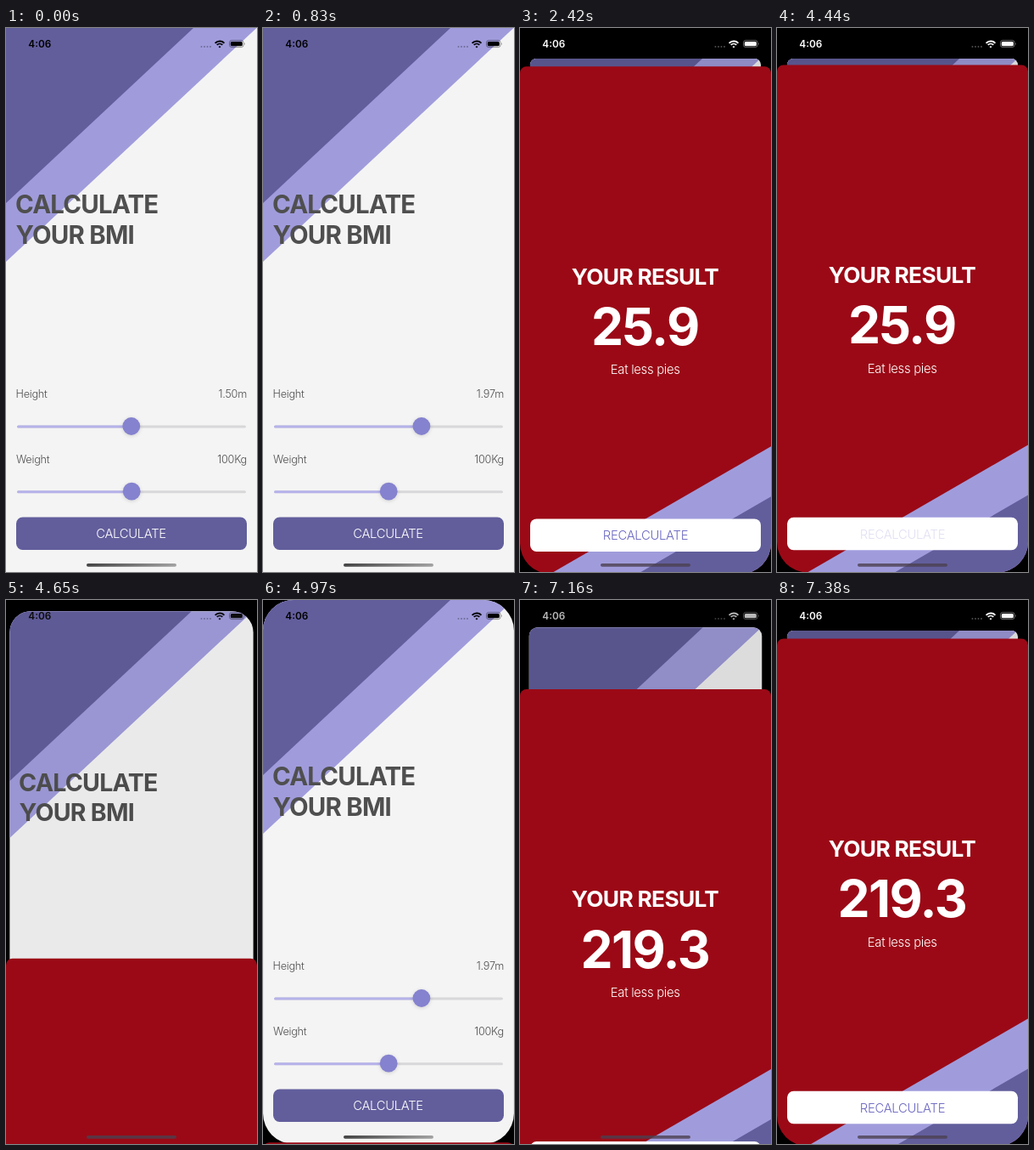
Animation of 296 by 640 pixels, one loop 8 s. Source, as an HTML page:

```html
<!DOCTYPE html>
<html lang="en">
<head>
<meta charset="utf-8">
<title>BMI calculator</title>
<style>
  html, body { margin: 0; width: 100%; height: 100%; overflow: hidden; background: #000; }
  #stage { position: relative; width: 296px; height: 640px; overflow: hidden; background: #000; }
  #stage > * { position: absolute; left: 0; top: 0; overflow: hidden; }
  svg { display: block; }
  #card { width: 296px; height: 640px; background: #f4f4f4; transform-origin: 0 0; }
  #dim { position: absolute; inset: 0; background: #000; }
  #modal { width: 296px; height: 596.5px; background: #9b0916; border-radius: 7.6px 7.6px 36px 36px; }
  text {
    font-family: Inter, "Open Sans", sans-serif;
    font-optical-sizing: none;
    font-weight: 300;
    letter-spacing: -.02em;
  }
  .bold { font-weight: 700; letter-spacing: -.026em; }
  .mid { text-anchor: middle; }
  .end { text-anchor: end; }
  .title { font-size: 29.4px; fill: #4f4f4f; }
  .label { font-size: 12.7px; fill: #505050; }
  .action { font-size: 14.8px; }
  .time { font-size: 11.8px; font-weight: 600; letter-spacing: 0; }
  .thumb { fill: #8582cf; filter: drop-shadow(0 1px 2px rgba(0, 0, 0, .15)); }
</style>
</head>
<body>
<div id="stage">
  <div id="card">
    <svg width="296" height="640">
      <path d="M0 0H295.5L0 275z" fill="#a09cdc"/>
      <path d="M0 0H221L0 206z" fill="#625e9c"/>
      <text class="title bold" x="11" y="218">CALCULATE</text>
      <text class="title bold" x="11.5" y="254">YOUR BMI</text>
      <text class="label" x="11.5" y="435.3">Height</text>
      <text class="label end" id="height" x="284" y="435.3"></text>
      <text class="label" x="12" y="511.8">Weight</text>
      <text class="label end" x="284" y="511.8">100Kg</text>
      <g id="sliders"></g>
      <rect x="12" y="575.5" width="272" height="38.5" rx="7.6" fill="#625e9c"/>
      <text class="action mid" id="calc" x="147.5" y="600.3" fill="#fff">CALCULATE</text>
    </svg>
    <div id="dim"></div>
  </div>
  <div id="modal">
    <svg width="296" height="597">
      <path d="M296 447L34 598H296z" fill="#a09cdc"/>
      <path d="M296 506L137 598H296z" fill="#625e9c"/>
      <g fill="#fff">
        <text class="bold mid" x="147.5" y="256.5" font-size="26.3">YOUR RESULT</text>
        <text class="bold mid" id="result" x="147.3" y="327.8" font-size="60.5"></text>
        <text class="action mid" x="147.7" y="362">Eat less pies</text>
        <rect x="12" y="532.2" width="272" height="38.5" rx="7.6"/>
      </g>
      <text class="action mid" id="recalc" x="148" y="557" fill="#6a66c0">RECALCULATE</text>
    </svg>
  </div>
  <svg id="status" width="296" height="640" fill="currentColor">
    <defs>
      <linearGradient id="sheen">
        <stop offset="0" stop-color="#444"/>
        <stop offset="1" stop-color="#a2a2a2"/>
      </linearGradient>
    </defs>
    <text class="time" x="26.3" y="23">4:06</text>
    <g opacity=".3">
      <circle cx="230.5" cy="22" r="1"/><circle cx="234" cy="22" r="1"/>
      <circle cx="237.5" cy="22" r="1"/><circle cx="241" cy="22" r="1"/>
    </g>
    <g fill="none" stroke="currentColor" stroke-width="1.9">
      <path d="M246.6 17.8a7.6 7.6 0 0 1 10.8 0"/>
      <path d="M248.75 19.95a4.6 4.6 0 0 1 6.5 0"/>
    </g>
    <path d="M252 23.4l-1.5-1.5a2.1 2.1 0 0 1 3 0z"/>
    <rect x="263.5" y="14.6" width="16.6" height="8" rx="2.6" fill="none" stroke="currentColor" opacity=".4"/>
    <rect x="264.8" y="15.9" width="14" height="5.4" rx="1.5"/>
    <path d="M281.2 17.2q1.4 1.4 0 2.8z" opacity=".5"/>
    <rect id="home" x="95" y="630" width="106" height="3.7" rx="1.85"/>
  </svg>
</div>
<script>
const LOOP = 8000;
// The picture holds still between these moments.
const STEPS = [0, 500, 610, 720, 830, 1860, 1970, 2080, 2200, 2310, 2420,
  4440, 4540, 4650, 4760, 4860, 4970, 5460, 5580, 5700, 5810, 5930, 6050,
  6820, 7050, 7160, 7270, 7380];
const OPEN_1 = 1978, CLOSE = 4532, OPEN_2 = 6949;
const WEIGHT = 100, TALL = 1.966, SMALL = .6753;
const $ = id => document.getElementById(id);
const mix = (a, b, k) => a + (b - a) * k;

// Critically damped spring: share of the way still to go.
function spring(ms) {
  const u = 18.26 * ms / 1000;
  return (1 + u) * Math.exp(-u);
}

function openness(t) {
  if (t < OPEN_1) return 0;
  if (t < 4440) return 1 - spring(t - OPEN_1);
  if (t < CLOSE) return 1;
  if (t < 5460) return spring(t - CLOSE);
  if (t < OPEN_2) return 0;
  return 1 - spring(t - OPEN_2);
}

function drag(t, start, end, from, to) {
  const k = Math.min(1, Math.max(0, (t - start + 110) / (end - start + 110)));
  return mix(from, to, k * k * (3 - 2 * k));
}

function heightAt(t) {
  if (t < 500) return 1.5;
  if (t < 5460) return drag(t, 500, 830, 1.5, TALL);
  return drag(t, 5460, 6050, TALL, SMALL);
}

const within = (t, a, b) => t >= a && t < b;

function slider(y, x) {
  return `<rect x="13" y="${y - 1}" width="270" height="3" rx="1.5" fill="#d8d8da"/>
    <rect x="13" y="${y - 1}" width="${x - 13}" height="3" rx="1.5" fill="#b6b2ea"/>
    <circle class="thumb" cx="${x}" cy="${y}" r="10.4"/>`;
}

function draw(t) {
  const p = openness(t), h = heightAt(t);
  const scale = 1 - .081 * p;

  $('height').textContent = h.toFixed(2) + 'm';
  $('sliders').innerHTML = slider(468.5, 147.8 + 84 * (h - 1.5)) + slider(545.2, 148.2);
  $('calc').style.opacity = within(t, 1860, 1970) || within(t, 6820, 7050) ? .2 : 1;
  $('recalc').style.opacity = within(t, 4440, 4540) ? .2 : 1;

  $('card').style.transform = `translate(${148 * (1 - scale)}px, ${36 * p}px) scale(${scale})`;
  $('card').style.borderRadius = (p > 0 ? mix(36, 8, p) : 0) + 'px';
  $('dim').style.opacity = .11 * p;

  const tall = t < OPEN_2 ? TALL : SMALL;
  $('result').textContent = (WEIGHT / tall ** 2).toFixed(1);
  $('modal').style.visibility = p > 0 ? 'visible' : 'hidden';
  $('modal').style.transform = `translateY(${mix(640, 43.5, p)}px)`;

  const tone = Math.round(255 * p ** 3);
  $('status').style.color = `rgb(${tone},${tone},${tone})`;
  $('home').setAttribute('fill', p > .1 ? 'rgba(75,64,80,.8)' : 'url(#sheen)');
}

const began = performance.now();
let shown = -1;
function tick() {
  const now = (performance.now() - began) % LOOP;
  const step = STEPS.filter(s => s <= now).pop();
  if (step !== shown) draw(shown = step);
  requestAnimationFrame(tick);
}
tick();
</script>
</body>
</html>
```
